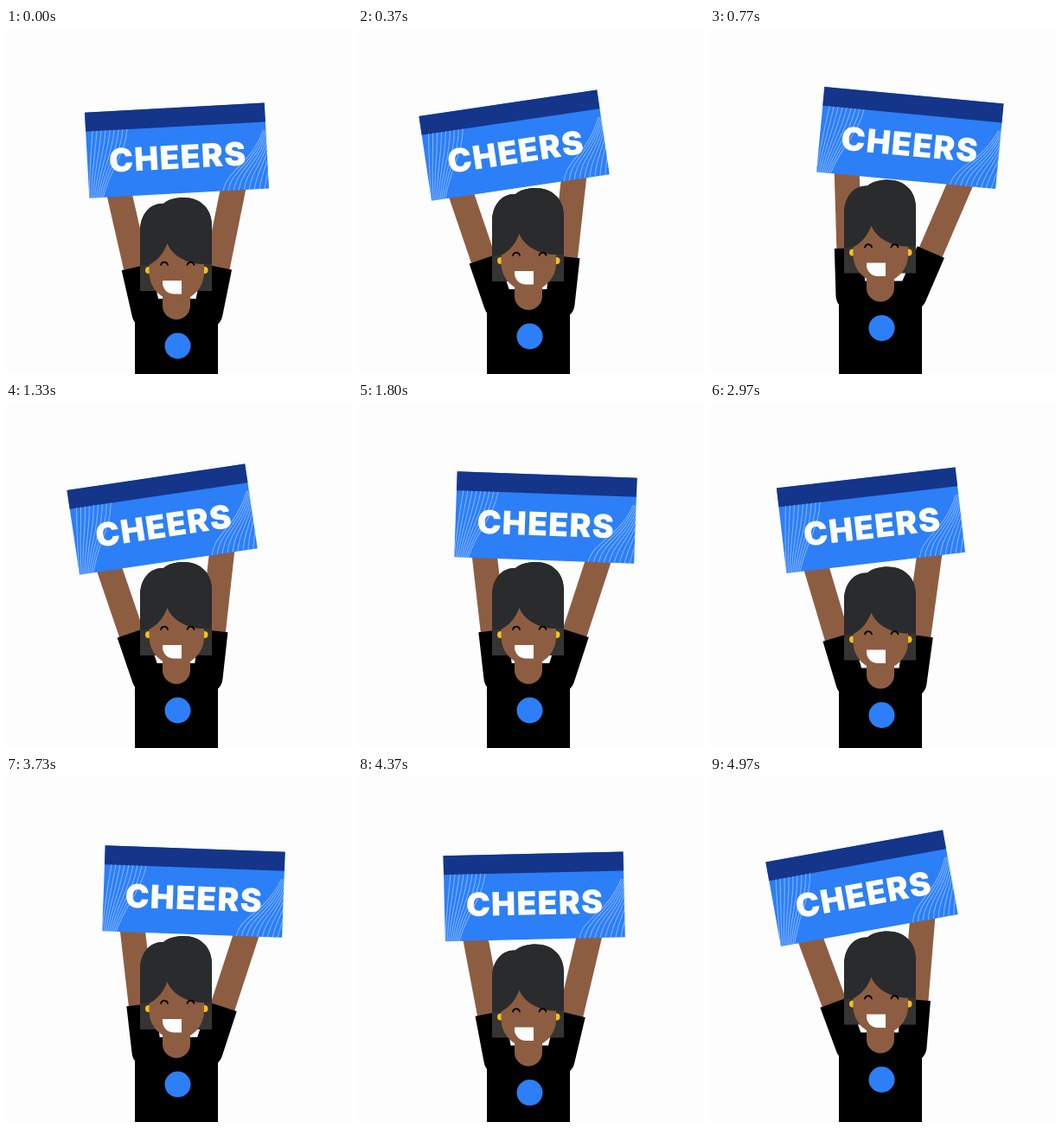
An HTML page for the animation above (5010 ms loop, 400 by 400 pixels).

```html
<!DOCTYPE html>
<html lang="en">
<head>
<meta charset="utf-8">
<title>Cheers</title>
<style>
  html, body { margin: 0; width: 100%; height: 100%; overflow: hidden; background: #fdfdfe; }
  svg { display: block; width: 100vw; height: 100vh; }
  .skin { fill: #8d5d42; }
  .hair-back { fill: #353433; }
  .hair { fill: #2a2b2c; }
  .ring { fill: #f8bf1c; }
  .blue { fill: #2c7ff7; }
  .navy { fill: #14358a; }
  .light { fill: #fdfdfe; }
  .eyes { fill: none; stroke: #000; stroke-width: 1.7; stroke-linecap: round; }
  .waves { fill: none; stroke: #fff; stroke-opacity: .42; stroke-width: 1; }
  .word { font: 900 37.5px Inter, "Open Sans", sans-serif; letter-spacing: 1.2px; text-anchor: middle; }
</style>
</head>
<body>
<svg viewBox="0 0 400 400">
  <defs>
    <!-- Shoulder at the origin, arm pointing up -->
    <g id="arm">
      <rect class="skin" x="-14.5" y="-165" width="29" height="165"/>
      <path d="M-17 -55H17V0A17 17 0 0 1 -17 0Z"/>
    </g>
    <clipPath id="board"><rect x="-104" y="-28" width="208" height="77.5"/></clipPath>
  </defs>

  <use id="armL" href="#arm"/>
  <use id="armR" href="#arm"/>

  <g id="body">
    <rect x="149" y="302" width="96" height="130"/>
    <circle class="blue" cx="198.5" cy="356.5" r="15"/>
    <path class="hair-back" d="M155 293V224C155 203 168 191 182 192C188 187 196 185 205 185C225 185 238 198 238 217V293Z"/>
    <path class="skin" d="M181 285H213V310A16 16 0 0 1 181 310Z"/>
    <circle class="ring" cx="165" cy="269" r="4"/>
    <circle class="ring" cx="229.5" cy="269" r="4"/>
    <path class="skin" d="M165.5 230H229V272A31.75 32 0 0 1 165.5 272Z"/>
    <path class="hair" d="M155 263V224C155 203 168 191 182 192C188 187 196 185 205 185C225 185 238 198 238 217V262H229C212 262 193 254 186.5 238C182 250 174 259 165 263Z"/>
    <path class="eyes" d="M179 263C180 258.5 186 258.5 187 263M209.5 263C210.5 258.5 216.5 258.5 217.5 263"/>
    <path class="light" d="M181 281H203V296.5H194A13 13 0 0 1 181 283.5Z"/>
  </g>

  <g id="sign">
    <rect class="blue" x="-104" y="-49.5" width="208" height="99"/>
    <rect class="navy" x="-104" y="-49.5" width="208" height="22"/>
    <path id="waves" class="waves" clip-path="url(#board)"/>
    <text class="word light" x=".6" y="21">CHEERS</text>
  </g>
</svg>
<script>
  const $ = id => document.getElementById(id);
  const LOOP = 5010;
  const SHOULDER_Y = 319;
  const RAD = Math.PI / 180;

  const place = (id, x, y, turn = 0) =>
    $(id).setAttribute("transform", `translate(${x} ${y}) rotate(${turn})`);

  let lines = "";
  for (let i = 0; i < 9; i++) {
    const a = 5 * i, b = 6 * i;
    lines += `M${-56 - a} -28C${-60 - a} 2 ${-78 - 3 * i} 16 ${-88 - 2 * i} 50`;
    lines += `M${51 + b} 50C${56 + b} 25 ${84 + 3 * i} 22 ${101 + 2 * i} -18`;
  }
  $("waves").setAttribute("d", lines);

  // Drawing step at 25 per second, shown on a 30 per second clock
  function stepAt(time) {
    const tick = Math.min(149, Math.floor((time + 4) * 0.03));
    return Math.ceil(tick * 5 / 6 - 0.5);
  }

  const bobAt = step => 11 * Math.cos(step * Math.PI / 6);

  function aim(id, shoulderX, shoulderY, sign, gripX) {
    const c = Math.cos(sign.turn * RAD), s = Math.sin(sign.turn * RAD);
    const dx = sign.x + gripX * c - 50 * s - shoulderX;
    const dy = sign.y + gripX * s + 50 * c - shoulderY;
    place(id, shoulderX, shoulderY, Math.atan2(dx, -dy) / RAD);
  }

  function draw(now) {
    const step = stepAt(now % LOOP);
    const bob = bobAt(step);
    const swing = Math.abs((step + 6) % 24 - 12) - 6;
    const bend = swing * swing;
    const sign = {
      x: 197.5 + 6.05 * swing + 0.14 * bend,
      y: 130.7 + bobAt(step + 0.25) + 0.27 * bend - 0.35 * swing,
      turn: -3.1 + 1.75 * swing - 0.01 * bend
    };
    place("body", 0, bob);
    place("sign", sign.x, sign.y, sign.turn);
    aim("armL", 162.5, SHOULDER_Y + bob, sign, -68.5);
    aim("armR", 233.5, SHOULDER_Y + bob, sign, 62);
  }

  const start = performance.now();
  function loop() {
    draw(performance.now() - start);
    requestAnimationFrame(loop);
  }
  loop();
</script>
</body>
</html>
```
